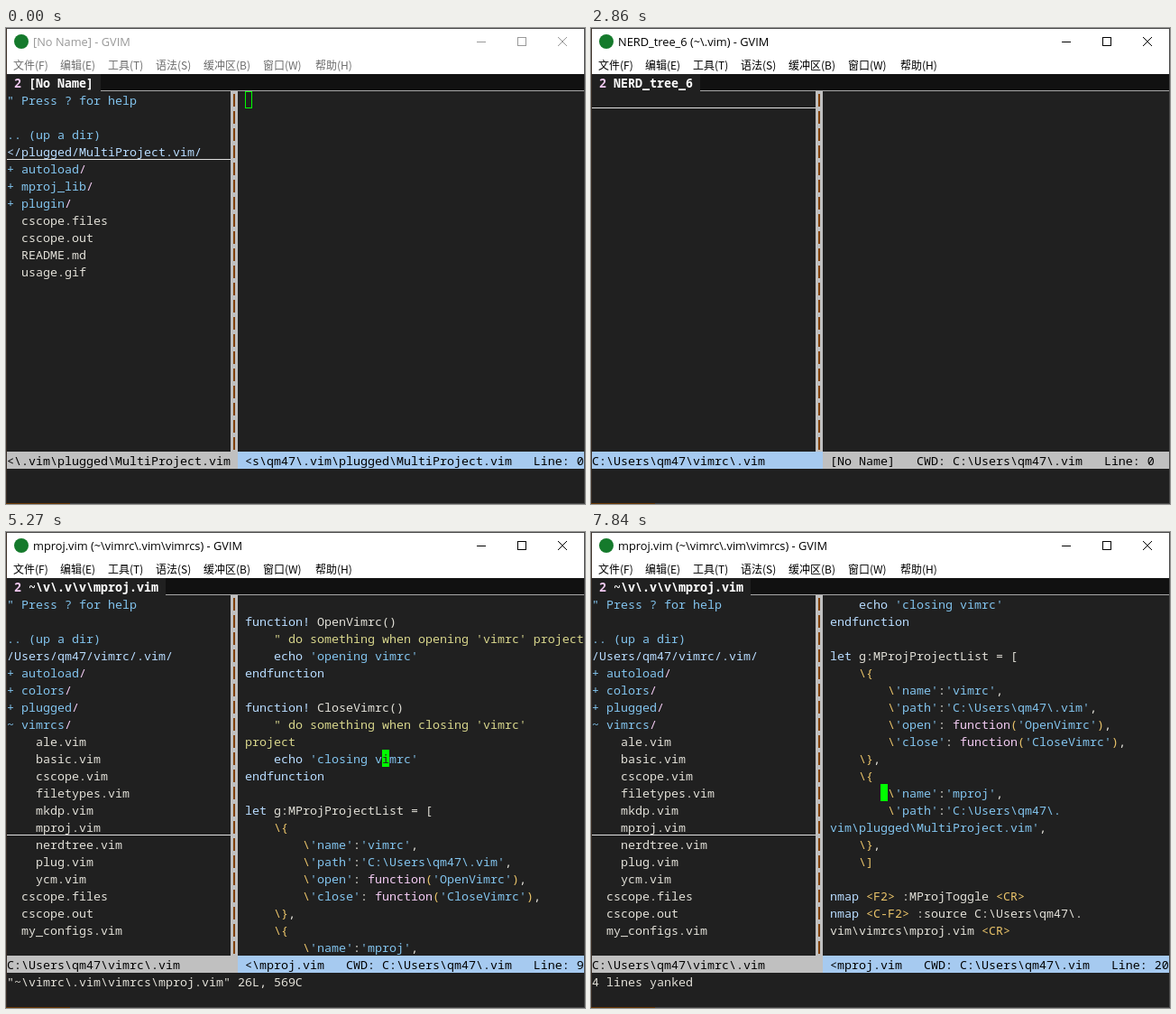
Animation, 642 px wide and 527 px high, one loop 8 s. Source, as an HTML page:

```html
<!DOCTYPE html>
<html lang="zh">
<head>
<meta charset="utf-8">
<title>GVIM</title>
<style>
html, body { margin: 0; width: 100%; height: 100%; overflow: hidden; background: #202020; }
#stage { position: relative; width: 642px; height: 527px; overflow: hidden; background: #202020; color: #e2e0d8; }
#stage > * { position: absolute; margin: 0; }
#bar { left: 0; top: 0; width: 642px; height: 51px; background: #fff; color: #000; }
#bar.idle { color: #999; }
#bar.idle #menu { color: #6d6d6d; }
#bar > * { position: absolute; }
#icon { left: 9px; top: 7px; width: 16px; height: 16px; border-radius: 50%; background: #157a2c; }
#title { left: 30px; top: 6px; font: 12.8px/18px "Open Sans", sans-serif; white-space: pre; }
#menu { left: 0; top: 32px; font: 12px/18px "Noto Sans CJK SC", "Noto Sans CJK", sans-serif; }
#menu span { position: absolute; white-space: pre; }
#buttons { left: 0; top: 0; fill: none; stroke: currentColor; }
pre { box-sizing: border-box; padding-top: 1px; font: 13.3333px/19px "Noto Sans Mono", monospace; white-space: pre; overflow: hidden; }
b { font-weight: normal; }
#tabs { left: 1px; top: 51px; width: 640px; height: 19px; padding: 0; background: #111; border-bottom: 1px solid #a8a8a8; overflow: visible; }
#tab { display: inline-block; height: 18px; padding-top: 1px; background: #202020; color: #fff; font-weight: bold; }
#tab b { color: #f0c8f0; font-weight: bold; }
#tree { left: 1px; top: 70px; width: 248px; height: 399px; }
#split { left: 249px; top: 70px; width: 8px; height: 399px; background: #c0c0c0; }
#split::after { content: ""; position: absolute; left: 3px; width: 2px; height: 100%;
  background: repeating-linear-gradient(transparent 0 3px, #804000 3px 17px, transparent 17px 19px); }
#code { left: 265px; top: 70px; width: 376px; height: 399px; }
.status { top: 469px; height: 19px; background: #c0c0c0; color: #000; }
.status.on { background: #a6caf0; }
#left { left: 1px; width: 256px; }
#right { left: 257px; width: 384px; padding-left: 8px; }
#command { left: 1px; top: 488px; width: 640px; height: 19px; }
#underline { left: 1px; width: 248px; height: 1px; background: #e0e0e0; }
#cursor { width: 8px; height: 19px; background: #0f0; color: #202020; }
#cursor.hollow { background: none; border: 1px solid #0f0; }
.dir, .str { color: #82c4ee; }
.slash, .fn { color: #f4ccf4; }
.key { color: #b8dcff; }
.note { color: #d8d68c; }
.sym { color: #ecc56a; }
.sel { background: #4a4a4a; }
#frame { inset: 0; box-sizing: border-box; border: 1px solid #484848; border-left-color: #3c3028; }
#ember { left: 0; bottom: 0; width: 71px; height: 1px; background: #6a3a08; }
</style>
</head>
<body>
<div id="stage">
  <div id="bar">
    <div id="icon"></div>
    <div id="title"></div>
    <div id="menu"></div>
    <svg id="buttons" width="642" height="31">
      <path d="M522 15.5h10M567.5 10.5h9v9h-9z" shape-rendering="crispEdges"/>
      <path d="M612 10l10 10m0-10l-10 10"/>
    </svg>
  </div>
  <pre id="tabs"><span id="tab"></span></pre>
  <pre id="tree"></pre>
  <div id="split"></div>
  <pre id="code"></pre>
  <pre id="left" class="status"></pre>
  <pre id="right" class="status"></pre>
  <pre id="command"></pre>
  <div id="underline"></div>
  <pre id="cursor"></pre>
  <div id="frame"></div>
  <div id="ember"></div>
</div>
<script>
const LOOP = 8000, ROWS = 21, CELL = 8, LINE = 19;
const $ = id => document.getElementById(id);
const raw = String.raw;

const help = '" Press ? for help\n\n.. (up a dir)\n';
const pluginTree = help + `</plugged/MultiProject.vim/
+ autoload/
+ mproj_lib/
+ plugin/
  cscope.files
  cscope.out
  README.md
  usage.gif`;
const vimTree = children => help + `/Users/qm47/vimrc/.vim/
+ autoload/
+ colors/
+ plugged/
${children}
  cscope.files
  cscope.out
  my_configs.vim`;
const closedTree = vimTree("+ vimrcs/");
const openTree = vimTree("~ vimrcs/\n" +
  "ale basic cscope filetypes mkdp mproj nerdtree plug ycm".split(" ").map(n => `    ${n}.vim`).join("\n"));

// "¬" marks a soft wrap inside one file line
const source = raw`
function! OpenVimrc()
    " do something when opening 'vimrc' project
    echo 'opening vimrc'
endfunction

function! CloseVimrc()
    " do something when closing 'vimrc' ¬project
    echo 'closing vimrc'
endfunction

let g:MProjProjectList = [
    \{
        \'name':'vimrc',
        \'path':'C:\Users\qm47\.vim',
        \'open': function('OpenVimrc'),
        \'close': function('CloseVimrc'),
    \},
    \{
        \'name':'mproj',
        \'path':'C:\Users\qm47\.¬vim\plugged\MultiProject.vim',
    \},
    \]

nmap <F2> :MProjToggle <CR>
nmap <C-F2> :source C:\Users\qm47\.¬vim\vimrcs\mproj.vim <CR>`.split("\n");

const treeSyntax = /(?<dir>^" .*|^\.\. .*|^[+~] \w+)|(?<key>^[\/<].*)|(?<slash>\/$)/g;
const codeSyntax = /(?<note>^\s*".*|^project)|(?<str>'[^']*'?|^vim\\plug[^']*')|(?<sym>^\s*\\[\]{}]*|<[^>]+>|(?<=function)\(|(?<=')\))|(?<fn>function(?=\())|(?<key>^\s*(?:function!|endfunction|echo|let|nmap))/g;

const escape = s => s.replace(/&/g, "&amp;").replace(/</g, "&lt;");
function paint(row, syntax) {
  let html = "", at = 0;
  for (const m of row.matchAll(syntax)) {
    const kind = Object.keys(m.groups).find(k => m.groups[k]);
    html += escape(row.slice(at, m.index)) + `<b class="${kind}">${escape(m[0])}</b>`;
    at = m.index + m[0].length;
  }
  return html + escape(row.slice(at));
}

const vimCwd = raw`CWD: C:\Users\qm47\.vim   Line: `;
const inTree = row => ({ underline: row, cursor: [row, 0] });
const command = text => ({ command: text, cursor: [23, text.length] });
const inFile = (line, top = 1, column = 19) => ({
  line, top, column, cursor: null, right: (line < 10 ? raw`<\mproj.vim` : "<mproj.vim") + "   " + vimCwd + line
});

// Each step changes only the listed properties.
const steps = [
  [0, { title: "[No Name] - GVIM", tab: "[No Name]", focus: false, active: "right", tree: pluginTree, underline: 4,
        left: raw`<\.vim\plugged\MultiProject.vim`, right: raw`<s\qm47\.vim\plugged\MultiProject.vim   Line: 0`,
        command: "", cursor: [1, 33], line: 0, top: 0, select: null }],
  [50, { focus: true }],
  [430, command(":")],
  [720, command(":M")],
  [990, command(":MP")],
  [1370, command(":MProjToggle")],
  [1730, { command: "", title: "MProjList - GVIM", tab: "MProjList", active: "left", left: "MProjList",
           tree: "vimrc\nmproj", ...inTree(1) }],
  [2610, { title: raw`NERD_tree_6 (~\.vim) - GVIM`, tab: "NERD_tree_6", tree: "", underline: 1, cursor: null,
           left: raw`C:\Users\qm47\vimrc\.vim`, right: "[No Name]   " + vimCwd + "0" }],
  [2910, { title: raw`NERD_tree_6 - (~\.vim) - GVIM`, tree: closedTree, ...inTree(4) }],
  [3190, inTree(5)],
  [3360, inTree(6)],
  [3530, inTree(7)],
  [3710, inTree(8)],
  [3780, { tree: openTree }],
  [3960, inTree(9)],
  [4460, inTree(10)],
  [4530, inTree(12)],
  [4590, inTree(14)],
  [4840, { title: raw`mproj.vim (~\vimrc\.vim\vimrcs) - GVIM`, tab: raw`~\v\.v\v\mproj.vim`, active: "right",
           command: raw`"~\vimrc\.vim\vimrcs\mproj.vim" 26L, 569C`, ...inFile(9) }],
  [5700, inFile(10)],
  [5920, inFile(12)],
  [6130, inFile(13)],
  [6630, { command: "", ...inFile(14) }],
  [6690, inFile(15, 3)],
  [6760, inFile(16, 4)],
  [6820, inFile(17, 5)],
  [6890, inFile(20, 9)],
  [7270, inFile(19, 9)],
  [7410, { command: "-- VISUAL LINE --", select: [19, 19] }],
  [7550, { select: [19, 21], ...inFile(21, 9, 5) }],
  [7690, { select: [19, 22], ...inFile(22, 9, 5) }],
  [7840, { command: "4 lines yanked", select: null, ...inFile(20, 9, 7) }]
];
let merged = {};
const states = steps.map(([time, change]) => ({ time, ...(merged = { ...merged, ...change }) }));

function codeRows(s) {
  const rows = [];
  if (s.top) source.slice(s.top - 1).forEach((text, i) => {
    for (const row of text.split("¬")) rows.push({ row, line: s.top + i });
  });
  return rows.slice(0, ROWS);
}

function draw(s) {
  $("bar").className = s.focus ? "" : "idle";
  $("title").textContent = s.title;
  $("tab").innerHTML = ` <b>2</b> ${escape(s.tab)} `;
  $("tree").innerHTML = s.tree.split("\n").map(row => paint(row, treeSyntax)).join("\n");
  const rows = codeRows(s);
  $("code").innerHTML = rows.map(({ row, line }) => {
    const html = paint(row, codeSyntax);
    return s.select && line >= s.select[0] && line <= s.select[1] ? `<b class="sel">${html} </b>` : html;
  }).join("\n");
  for (const side of ["left", "right"]) {
    $(side).textContent = s[side];
    $(side).classList.toggle("on", s.active === side);
  }
  $("command").textContent = s.command;
  $("underline").style.top = 51 + LINE * s.underline + 18 + "px";

  let place = s.cursor, glyph = "";
  if (place && s.active === "left") glyph = (s.tree.split("\n")[place[0] - 1] || "")[0] || "";
  if (!place && s.line) {
    const index = rows.findIndex(r => r.line === s.line), text = rows[index].row;
    const column = Math.max(0, Math.min(s.column, text.length - 1));
    place = [index + 1, 33 + column];
    glyph = text[column] || "";
  }
  const cursor = $("cursor");
  cursor.style.display = place ? "" : "none";
  cursor.className = s.focus ? "" : "hollow";
  cursor.textContent = glyph;
  if (place) {
    cursor.style.top = 51 + LINE * place[0] + "px";
    cursor.style.left = 1 + CELL * place[1] + "px";
  }
}

const menu = { "文件(F)": 8, "编辑(E)": 60, "工具(T)": 113, "语法(S)": 166, "缓冲区(B)": 219, "窗口(W)": 285, "帮助(H)": 343 };
$("menu").innerHTML = Object.entries(menu).map(([name, x]) => `<span style="left:${x}px">${name}</span>`).join("");

const start = performance.now();
let shown;
function tick() {
  const time = Math.max(0, performance.now() - start) % LOOP;
  const state = states.findLast(s => s.time <= time);
  if (state !== shown) draw(shown = state);
  requestAnimationFrame(tick);
}
tick();
</script>
</body>
</html>
```
